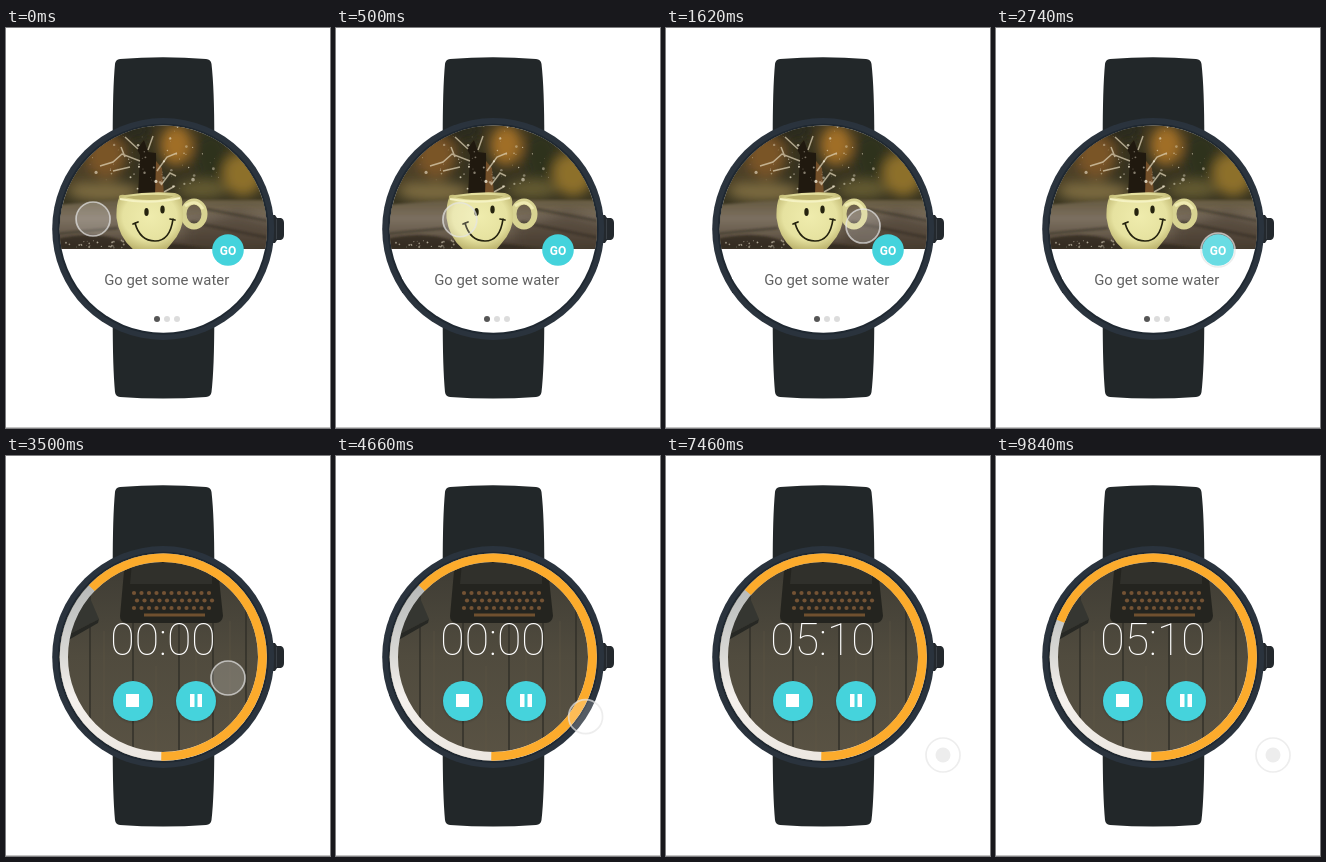
These frames come from a looping animation (324 px wide and 400 px high, 9860 ms). An HTML page:

```html
<!DOCTYPE html>
<html lang="en">
<head>
<meta charset="utf-8">
<style>
html, body { margin: 0; width: 100%; height: 100%; overflow: hidden; background: #fff; }
svg { display: block; width: 324px; height: 400px; }
text { font-family: Roboto, sans-serif; text-anchor: middle; }
</style>
</head>
<body>
<svg viewBox="0 0 324 400">
  <defs>
    <clipPath id="face"><circle cx="157.3" cy="201.2" r="103.6"/></clipPath>
    <clipPath id="photo"><path d="M50 90H265V221H50Z"/></clipPath>
    <filter id="soft" x="-50%" y="-50%" width="200%" height="200%"><feGaussianBlur stdDeviation="6"/></filter>
    <filter id="blur" x="-20%" y="-20%" width="140%" height="140%"><feGaussianBlur stdDeviation="1.2"/></filter>
    <linearGradient id="table" x2="0" y2="1">
      <stop stop-color="#665a41"/><stop offset=".35" stop-color="#7c7060"/><stop offset=".65" stop-color="#665a4b"/><stop offset="1" stop-color="#3b3025"/>
    </linearGradient>
    <radialGradient id="cup" cx=".5" cy=".42" r=".62">
      <stop stop-color="#efecad"/><stop offset=".65" stop-color="#e6e2a0"/><stop offset="1" stop-color="#b9b06a"/>
    </radialGradient>
    <linearGradient id="wood" x2="0" y2="1">
      <stop stop-color="#3b3932"/><stop offset=".5" stop-color="#504b3e"/><stop offset="1" stop-color="#5a5344"/>
    </linearGradient>
    <linearGradient id="track" x2="0" y2="1">
      <stop stop-color="#a9adad"/><stop offset=".45" stop-color="#d5d5d2"/><stop offset=".7" stop-color="#f4f0ec"/><stop offset="1" stop-color="#ece7e1"/>
    </linearGradient>
  </defs>

  <rect width="324" height="400" fill="#fff"/>
  <rect y="399" width="324" height="1" fill="#c4c4c4"/>
  <path d="M106.7 110Q106.7 60 109 36Q109.500 31.500 114 31Q157 27.500 200 31Q205 31.500 205.500 36Q208.300 60 208.300 110V290Q208.300 340 205.500 364Q205 368.500 200 369Q157 372 114 369Q109.500 368.500 109 364Q106.700 340 106.700 290Z" fill="#222729"/>
  <path d="M262 187H269L271 190H275Q278 191 278 195V207Q278 211 275 212H271L269 215H262Z" fill="#23282d"/>
  <path d="M270.500 191V211" stroke="#3a4046"/>
  <circle cx="157.200" cy="201" r="111" fill="#2a333d"/>
  <circle cx="157.200" cy="201.200" r="105.500" fill="#1f2831"/>

  <g clip-path="url(#face)">
    <g id="card">
      <rect x="50" y="90" width="216" height="216" fill="#fff"/>
      <g clip-path="url(#photo)">
        <rect x="50" y="90" width="216" height="135" fill="#373320"/>
        <g filter="url(#soft)">
          <ellipse cx="100" cy="126" rx="20" ry="25" fill="#7a5426"/>
          <ellipse cx="70" cy="148" rx="15" ry="18" fill="#4c4127"/>
          <ellipse cx="125" cy="102" rx="22" ry="13" fill="#2c2b1b"/>
          <ellipse cx="170" cy="117" rx="16" ry="20" fill="#a06e26"/>
          <ellipse cx="205" cy="128" rx="18" ry="25" fill="#2d321f"/>
          <ellipse cx="237" cy="146" rx="20" ry="22" fill="#8d702c"/>
          <ellipse cx="196" cy="161" rx="25" ry="9" fill="#655b32"/>
          <ellipse cx="98" cy="164" rx="36" ry="10" fill="#7b6a3f"/>
        </g>
        <path d="M50 177L110 172H268V225H50Z" fill="url(#table)" filter="url(#blur)"/>
        <path d="M178 198L232 183L268 196V225H180Z" fill="#493e33" opacity=".65" filter="url(#soft)"/>
        <path d="M50 206L112 200M195 180L268 194M185 194L268 211" stroke="#2b251d" stroke-width="2" opacity=".55" filter="url(#blur)"/>
        <path d="M50 211Q90 202 116 213L170 216L205 221H50Z" fill="#2d251b" opacity=".75" filter="url(#blur)"/>
        <path d="M132 168L134 127L131 121L138 112L142 124L150 125L151 168Z" fill="#20190f"/>
        <path d="M149 168L150 133L156 140L158 168Z" fill="#74502a"/>
        <path d="M134 133L116 126L107 134L94 138M119 129L115 119M132 121L119 109M142 122L147 108M151 143L161 129L171 125M155 157L164 145L170 148M158 164L169 158M124 139L107 143" fill="none" stroke="#e3d7bb" stroke-width="1.500" opacity=".7"/>
        <g id="drops" fill="#eee6d0"/>
        <ellipse cx="188" cy="186" rx="10.500" ry="12.500" fill="none" stroke="#d8d392" stroke-width="6"/>
        <path d="M179 178Q190 170 197 181" fill="none" stroke="#efebb2" stroke-width="3"/>
        <path d="M113 170Q112 166 119 167Q144 163 169 165Q178 167 176 177Q181 199 165 216L160 222H128Q113 210 110.500 190Q110 177 113 170Z" fill="url(#cup)"/>
        <path d="M119 169Q144 165 168 168Q161 172 144 172T119 169Z" fill="#b9b06a"/>
        <path d="M114 171Q143 177 174 170" fill="none" stroke="#f5f2c2" stroke-width="2"/>
        <g fill="#25230f"><ellipse cx="140.500" cy="184" rx="2.200" ry="4"/><ellipse cx="156.500" cy="181.500" rx="2.200" ry="4"/></g>
        <path d="M129 195Q134 213 149 213T167 191M127 196L132 194M164 191L169 192" fill="none" stroke="#25230f" stroke-width="1.700" stroke-linecap="round"/>
      </g>
      <text x="160.700" y="257" font-size="14.900" fill="#606060">Go get some water</text>
      <circle cx="151" cy="291" r="3" fill="#555"/>
      <circle cx="161" cy="291" r="3" fill="#dcdcdc"/>
      <circle cx="171" cy="291" r="3" fill="#dcdcdc"/>
      <circle cx="222" cy="222" r="15.800" fill="#44d3dc"/>
      <text x="222" y="226.500" font-size="12" font-weight="700" fill="#fff">GO</text>
    </g>

    <g id="timer">
      <rect x="50" y="90" width="216" height="220" fill="url(#wood)"/>
      <path d="M84 90V310M127 160V310M173 160V310M207 150V310M240 90V310" stroke="#302e27" stroke-width="1.4"/>
      <path d="M98 175V305M150 210V305M190 195V300M224 165V270" stroke="#655d4b" opacity=".4"/>
      <path d="M50 135L78 128L93 163L58 181Z" fill="#353631"/>
      <path d="M58 181L93 163L92 167L59 186Z" fill="#272824"/>
      <path d="M50 250Q82 285 130 306H60Z" fill="#b9b2a2" opacity=".55"/>
      <path d="M119 104H211L217 160Q216 167 210 167H120Q114 166 114 160Z" fill="#24241f"/>
      <path d="M126 107H206V128H124Z" fill="#30302b"/>
      <g id="keys" fill="#745334"/>
      <path d="M138 159H199" stroke="#70502f" stroke-width="3"/>
      <circle cx="157" cy="201" r="99.5" fill="none" stroke="url(#track)" stroke-width="9"/>
      <path id="ring" fill="none" stroke="#fcab2c" stroke-width="9"/>
      <text id="clock" x="157" y="199" font-size="44.500" font-weight="100" fill="#fff">00:00</text>
      <g fill="#111" opacity=".25" filter="url(#blur)"><circle cx="127" cy="246" r="20"/><circle cx="190" cy="246" r="20"/></g>
      <g fill="#45d3dc"><circle cx="127" cy="245" r="20"/><circle cx="190" cy="245" r="20"/></g>
      <path d="M120 238H133V251H120ZM184 238H188.5V251H184ZM191.5 238H196V251H191.5Z" fill="#fff"/>
    </g>
  </g>

  <g id="cursor">
    <circle r="17" fill="#fff" fill-opacity=".2" stroke="#e6e6e6" stroke-opacity=".7" stroke-width="1.700"/>
    <circle id="dot" r="7.5" fill="#e8e8e8"/>
  </g>
</svg>
<script>
const LOOP = 9860;
const $ = id => document.getElementById(id);
const NS = 'http://www.w3.org/2000/svg';
const clamp = v => Math.max(0, Math.min(1, v));
const span = (t, a, b) => clamp((t - a) / (b - a));
const ease = p => p < .5 ? 2 * p * p : 1 - 2 * (1 - p) ** 2;

function add(parent, tag, attrs) {
  const el = document.createElementNS(NS, tag);
  for (const k in attrs) el.setAttribute(k, attrs[k]);
  parent.append(el);
}

let seed = 17;
const rnd = () => (seed = seed * 16807 % 2147483647) / 2147483647;
rnd();
for (let i = 0; i < 75; i++) {
  const a = Math.PI * (1.08 + rnd() * .88);
  const d = 12 + 62 * rnd();
  add($('drops'), 'circle', {
    cx: 148 + d * Math.cos(a), cy: 165 + d * Math.sin(a) * .95,
    r: .4 + rnd() ** 3 * 1.6, opacity: .35 + rnd() * .5
  });
}
for (let i = 0; i < 28; i++) {
  add($('drops'), 'circle', { cx: 58 + rnd() * 60, cy: 211 + rnd() * 9, r: .4 + rnd() * .6, opacity: .5 });
}
for (let row = 0; row < 3; row++) {
  for (let i = 0; i < 11; i++) {
    add($('keys'), 'circle', { cx: 128 + i * 7.5 + row % 2 * 3, cy: 137 + row * 7.5, r: 2.1 });
  }
}

// time, x, y
const path = [[0, 87, 191], [980, 158, 193], [1620, 197, 198], [2200, 222, 222],
  [4090, 222, 222], [5230, 277, 299], [LOOP, 277, 299]];

function slope(i, k) {
  if (i === 0) return (path[1][k] - path[0][k]) / path[1][0];
  if (i > 2) return 0;
  return (path[i + 1][k] - path[i - 1][k]) / (path[i + 1][0] - path[i - 1][0]);
}

function place(t) {
  let i = 0;
  while (i < path.length - 2 && t >= path[i + 1][0]) i++;
  const [a, b] = [path[i], path[i + 1]];
  const h = b[0] - a[0], p = (t - a[0]) / h;
  if (i >= 3) return [1, 2].map(k => a[k] + (b[k] - a[k]) * ease(p));
  return [1, 2].map(k =>
    a[k] * (1 + 2 * p) * (1 - p) ** 2 + b[k] * p * p * (3 - 2 * p) +
    h * (slope(i, k) * p * (1 - p) ** 2 + slope(i + 1, k) * p * p * (p - 1)));
}

function arc(deg) {
  const at = d => {
    const a = (90 - d) * Math.PI / 180;
    return `${157 + 99.5 * Math.cos(a)} ${201 + 99.5 * Math.sin(a)}`;
  };
  return `M${at(-1)}A99.5 99.5 0 1 0 ${at(deg)}`;
}

const two = n => String(n).padStart(2, '0');

function draw(t) {
  const [x, y] = place(t);
  $('cursor').setAttribute('transform', `translate(${x} ${y})`);
  $('dot').setAttribute('opacity', .8 * span(t, 4700, 5230));

  $('timer').setAttribute('opacity', ease(span(t, 2980, 3380)));
  $('ring').setAttribute('d', arc(226 + 4 * span(t, 4660, 8000) + 19 * span(t, 8000, LOOP)));
  const secs = Math.floor(310 * span(t, 4720, 6700));
  $('clock').textContent = two(Math.floor(secs / 60)) + ':' + two(secs % 60);
}

function tick() {
  draw(performance.now() % LOOP);
  requestAnimationFrame(tick);
}
tick();
</script>
</body>
</html>
```
